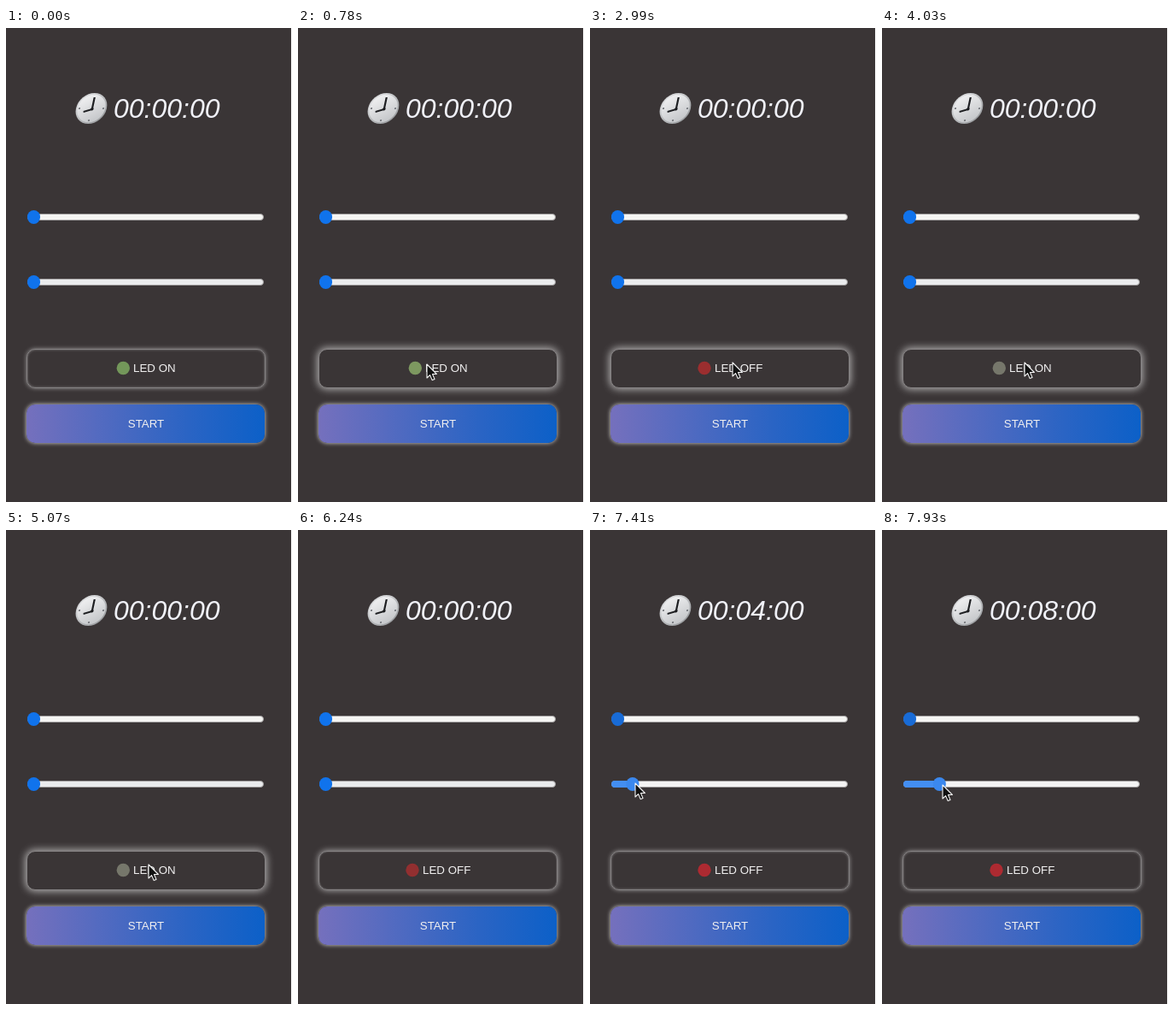
An HTML page for the animation above (8000 ms loop, 335 by 554 pixels).

```html
<!DOCTYPE html>
<html lang="en">
<head>
<meta charset="utf-8">
<title>Timer panel</title>
<style>
html, body { margin: 0; width: 100%; height: 100%; overflow: hidden; background: #3a3536; }
#stage { position: relative; width: 335px; height: 554px; overflow: hidden; background: #3a3536; }
#stage::after { content: ""; position: absolute; right: 0; top: 0; bottom: 0; width: 1px; background: #fff; }
svg { position: absolute; left: 0; top: 0; }
.btn { position: absolute; box-sizing: border-box; border-radius: 10px; }
#led { left: 23.5px; top: 374.5px; width: 280px; height: 46px; border: 1px solid #858283; background: #3a3536; }
#start { left: 24px; top: 440px; width: 279px; height: 45px; background: linear-gradient(90deg, #7570bd, #2a64c4 68%, #0c60c8); box-shadow: 0 0 5px rgba(255,255,255,.8); }
.track { position: absolute; left: 25px; width: 277px; height: 8px; box-sizing: border-box; border: 1px solid #a09e9e; border-radius: 4px; background: #f5f5f3; }
.fill { position: absolute; left: 25px; top: 293px; height: 8px; border-radius: 4px 0 0 4px; background: #438ef2; }
.thumb { position: absolute; left: 24.5px; width: 15.5px; height: 15.5px; border-radius: 50%; }
text { font-family: "Liberation Sans", Arial, sans-serif; font-size: 13.333px; fill: #f1f0f0; }
#time { font-size: 32px; font-style: italic; fill: #f0f1f8; }
</style>
</head>
<body>
<div id="stage">
  <div class="track" style="top:217px"></div>
  <div class="track" id="track" style="top:293px"></div>
  <div class="fill" id="fill"></div>
  <div class="thumb" id="hours" style="top:213px"></div>
  <div class="thumb" id="minutes" style="top:289px"></div>
  <div class="btn" id="led"></div>
  <div class="btn" id="start"></div>
  <svg width="335" height="554" viewBox="0 0 335 554">
    <defs>
      <linearGradient id="rim" x1="0" y1="0" x2="1" y2="1">
        <stop offset="0" stop-color="#e6e7e9"/><stop offset="1" stop-color="#8f9295"/>
      </linearGradient>
      <linearGradient id="face" x1="0" y1="0" x2=".6" y2="1">
        <stop offset="0" stop-color="#f6f6f7"/><stop offset="1" stop-color="#c6c8cb"/>
      </linearGradient>
    </defs>
    <g transform="translate(100 94) skewX(-12)">
      <circle r="18" fill="url(#rim)"/>
      <circle r="16.2" fill="url(#face)"/>
      <g fill="#6b6e73">
        <circle cx="14" r="1.1"/><circle cy="14" r="1.1"/><circle cx="-14" r="1.1"/>
      </g>
      <path d="M1-13V1L-8.5 4" fill="none" stroke="#1d1e21" stroke-width="2.2" stroke-linejoin="round"/>
      <circle cx="1" cy=".7" r="1.8" fill="#1d1e21"/>
    </g>
    <text id="time" x="126" y="105">00:00:00</text>
    <circle id="dot" cy="397.5" r="7.7"/>
    <text id="label" y="402"></text>
    <text x="164" y="467" text-anchor="middle">START</text>
    <path id="cursor" d="M0 0V16L3.6 12.6L6.2 18.6L9 17.4L6.5 11.5H11.4Z" fill="#111" stroke="#f4f4f4" stroke-width="1.1" stroke-linejoin="round"/>
  </svg>
</div>
<script>
const LOOP = 8000, STEP = 130;
const $ = id => document.getElementById(id);

// time, label state, dot colour
const led = [
  [0, "ON", "#73975a"], [390, "ON", "#7d9860"],
  [1040, "OFF", "#a02d2f"], [1820, "ON", "#79855f"],
  [2860, "OFF", "#9b2e2f"], [4030, "ON", "#76776b"],
  [5850, "OFF", "#922f30"], [6890, "OFF", "#ad2a31"]
];
// time, tip x, tip y; no position means hidden
const path = [
  [0], [130, 72, 412], [260, 92, 407], [390, 110, 402], [520, 127, 398],
  [650, 141, 395], [780, 151, 393], [910, 167, 391], [5980, 170, 436],
  [6110, 174, 538], [6240], [6890, 33, 290], [7020, 35, 288], [7150, 37, 291],
  [7280, 44, 294], [7410, 53, 296], [7540, 62, 297], [7800, 67, 298], [7930, 71, 298]
];
const minutes = [[0, 0], [7280, 2], [7410, 4], [7540, 6], [7800, 7], [7930, 8]];
const glow = [[0, 0], [130, .2], [650, 1], [5850, 1], [6500, 0], [LOOP, 0]];

const hold = (rows, t) => rows.findLast(r => r[0] <= t);

function ease(rows, t) {
  const i = rows.findIndex(r => r[0] > t);
  const [a, b] = [rows[i - 1], rows[i]];
  return a[1] + (b[1] - a[1]) * (t - a[0]) / (b[0] - a[0]);
}

function draw(t) {
  const [, state, colour] = hold(led, t);
  const on = state === "ON";
  $("label").textContent = "LED " + state;
  $("label").setAttribute("x", on ? 149 : 146);
  $("dot").setAttribute("cx", on ? 137.3 : 134);
  $("dot").setAttribute("fill", colour);

  const g = ease(glow, t);
  $("led").style.boxShadow =
    `0 0 ${5 + 5 * g}px ${g}px rgba(255,255,255,${.5 + .15 * g}), inset 0 0 ${3 * (1 - g)}px rgba(255,255,255,.35)`;

  const [, x, y] = hold(path, t);
  $("cursor").style.display = x === undefined ? "none" : "";
  if (x !== undefined) $("cursor").setAttribute("transform", `translate(${x} ${y})`);

  const m = hold(minutes, t)[1], shift = m / 60 * 261;
  const hover = t >= 6890;
  $("time").textContent = `00:${String(m).padStart(2, "0")}:00`;
  $("fill").style.width = (m ? shift + 8 : 0) + "px";
  $("minutes").style.transform = `translateX(${shift}px)`;
  $("minutes").style.background = m ? "#3b88ee" : hover ? "#1f66c4" : "#1073ec";
  $("hours").style.background = hover ? "#186bd6" : "#1073ec";
  $("track").style.background = m ? "#f4f4f4" : hover ? "#e3e4e5" : "#ebecee";
}

const begin = performance.now();
function tick() {
  const t = (performance.now() - begin) % LOOP;
  draw(Math.floor(t / STEP) * STEP);
  requestAnimationFrame(tick);
}
tick();
</script>
</body>
</html>
```
